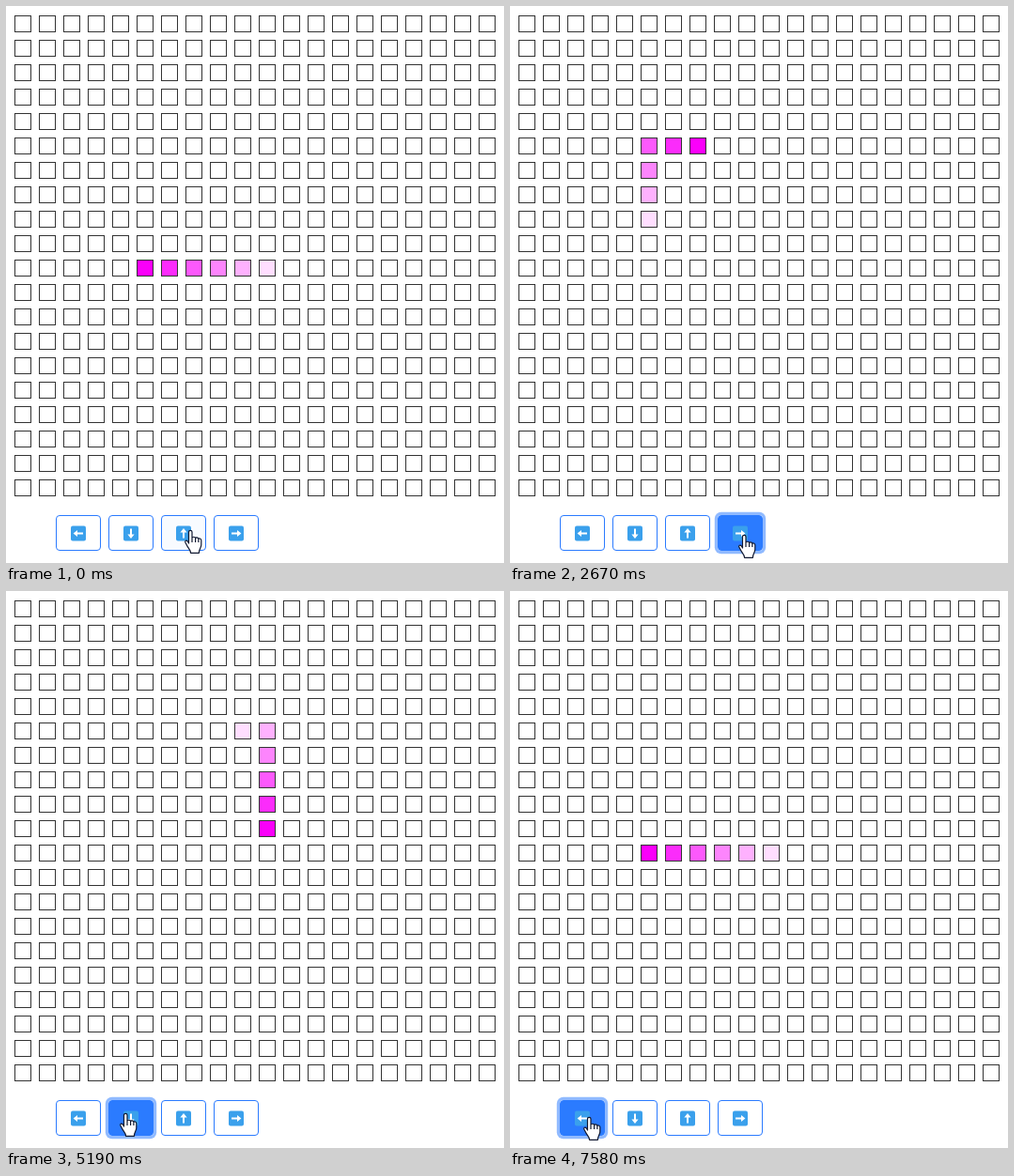
An HTML page for the animation above (7.65 s loop, 530x593 px).

```html
<!DOCTYPE html>
<html lang="en">
<head>
<meta charset="utf-8">
<title>Snake grid</title>
<style>
  html, body { margin: 0; width: 100%; height: 100%; overflow: hidden; background: #fff; }
  svg { display: block; }
</style>
</head>
<body>
<svg id="stage" width="530" height="593" viewBox="0 0 530 593"></svg>
<script>
const LOOP = 7650, STEP = 66.4, SIDE = 5;
const BLUE = '43,123,255';
const stage = document.getElementById('stage');

function add(parent, tag, attrs) {
  const el = document.createElementNS('http://www.w3.org/2000/svg', tag);
  for (const key in attrs) el.setAttribute(key, attrs[key]);
  parent.appendChild(el);
  return el;
}

// Grid
const cells = [];
for (let row = 0; row < 20; row++) {
  for (let col = 0; col < 20; col++) {
    cells.push(add(stage, 'rect', {
      x: 9.5 + 26 * col, y: 10.5 + 26 * row, width: 17, height: 17,
      fill: '#fff', stroke: '#333'
    }));
  }
}

// Buttons: hover spans are [enter, leave] times
const buttons = [
  { x: 53, turn: 180, hover: [[5693, 9000]], focus: [6060, LOOP] },
  { x: 109, turn: 90, hover: [[3860, 5643]], focus: [4250, 6060] },
  { x: 165, turn: -90, hover: [[-15, 1924], [3670, 3790]], focus: [330, 2340] },
  { x: 221, turn: 0, hover: [[1972, 3650]], focus: [2340, 4250] }
];
for (const b of buttons) {
  b.ring = add(stage, 'rect', {
    x: b.x - 3.2, y: 538.8, width: 54.4, height: 44.4, rx: 7, fill: `rgba(${BLUE},.52)`
  });
  add(stage, 'rect', { x: b.x, y: 542, width: 48, height: 38, rx: 4, fill: '#fff' });
  b.face = add(stage, 'rect', {
    x: b.x + .5, y: 542.5, width: 47, height: 37, rx: 3.5, stroke: `rgb(${BLUE})`
  });
  const icon = add(stage, 'g', { transform: `translate(${b.x + 24} 561.5) rotate(${b.turn})` });
  add(icon, 'rect', { x: -8, y: -8, width: 16, height: 16, rx: 2, fill: '#3aa0ec' });
  add(icon, 'path', { d: 'M-5-1H1V-3.6L5.4 0L1 3.6V1H-5Z', fill: '#fff' });
}

// Pointer
const spot = add(stage, 'circle', { r: 12, fill: 'rgba(210,205,0,.55)' });
const ink = { fill: '#fff', stroke: '#101830', 'stroke-width': 1.2, 'stroke-linejoin': 'round' };
const hand = add(stage, 'path', { ...ink, d:
  'M-1.5 13V1C-1.5-1.3 2-1.3 2 1V7.5C2.2 5.8 5.5 5.8 5.6 7.8C6 6.3 8.8 6.5 8.9 8.6' +
  'C9.4 7.4 11.8 7.8 11.8 10V14.5C11.8 17.5 9.6 18.5 9.4 23.3H.6C.4 20-2 18.5-3.2 15.8' +
  'L-5.2 12C-5.8 10.4-4 9.3-2.8 10.8ZM2 7V12M5.6 8V12M8.9 9V12' });
const arrow = add(stage, 'path', { ...ink, d: 'M0 0V17L4 13.3L6.6 19.3L9.3 18.1L6.8 12.3H12Z' });

const route = [
  [0, 196, 559], [460, 196, 559], [530, 194, 559], [1810, 194, 559], [2140, 249, 564],
  [3540, 249, 564], [3800, 161, 560], [4120, 127, 557], [5530, 127, 557],
  [5800, 84, 561], [7575, 84, 561], [7576, 109, 563], [LOOP, 109, 563]
];

// Clicks: [press, move, release]; release defaults to the move
const clicks = [
  [330, 400], [660, 720], [990, 1060], [1320, 1390], [1740, 1800],
  [2340, 2410], [2540, 2670], [2870, 2940], [3140, 3200, 3270], [3470, 3540],
  [4250, 4320], [4520, 4590], [4790, 4860, 4920], [5120, 5190], [5460, 5530],
  [6060, 6130, 6200], [6400, 6460], [6660, 6730], [6990, 7060], [7320, 7390]
];

const clamp = v => Math.max(0, Math.min(1, v));
const ease = v => v * v * (3 - 2 * v);
const show = (el, on) => el.setAttribute('visibility', on ? 'visible' : 'hidden');

// The snake circles a square: up, right, down, left
function place(n) {
  const k = (n + 20) % 20, i = k % SIDE;
  return [[5, 10 - i], [5 + i, 5], [10, 5 + i], [10 - i, 10]][Math.floor(k / SIDE)];
}

function pointerAt(t) {
  const i = Math.max(1, route.findIndex(p => p[0] > t));
  const [t0, x0, y0] = route[i - 1], [t1, x1, y1] = route[i];
  const k = clamp((t - t0) / (t1 - t0));
  return [x0 + (x1 - x0) * k, y0 + (y1 - y0) * k];
}

function fillAt(spans, t) {
  return Math.max(...spans.map(([enter, leave]) =>
    ease(clamp((t - enter) / 140)) * (1 - ease(clamp((t - leave) / 140)))));
}

let painted = [];
function draw(t) {
  const tick = Math.floor((t + 8) / STEP) * STEP;

  for (const cell of painted) cell.setAttribute('fill', '#fff');
  const moves = clicks.filter(c => t >= c[1]).length;
  painted = [];
  for (let i = 0; i <= SIDE; i++) {
    const [col, row] = place(moves - i);
    const cell = cells[row * 20 + col];
    cell.setAttribute('fill', `rgba(250,0,250,${1 - .174 * i})`);
    painted.push(cell);
  }

  for (const b of buttons) {
    show(b.ring, t >= b.focus[0] && t < b.focus[1]);
    b.face.setAttribute('fill', `rgba(${BLUE},${fillAt(b.hover, tick)})`);
  }

  const [x, y] = pointerAt(tick);
  const over = buttons.some(b => x >= b.x && x <= b.x + 48);
  for (const el of [spot, hand, arrow]) el.setAttribute('transform', `translate(${x} ${y})`);
  show(hand, over);
  show(arrow, !over);
  show(spot, clicks.some(([press, move, release = move]) => t >= press && t < release));
}

const start = performance.now();
function frame() {
  draw((performance.now() - start) % LOOP);
  requestAnimationFrame(frame);
}
frame();
</script>
</body>
</html>
```
